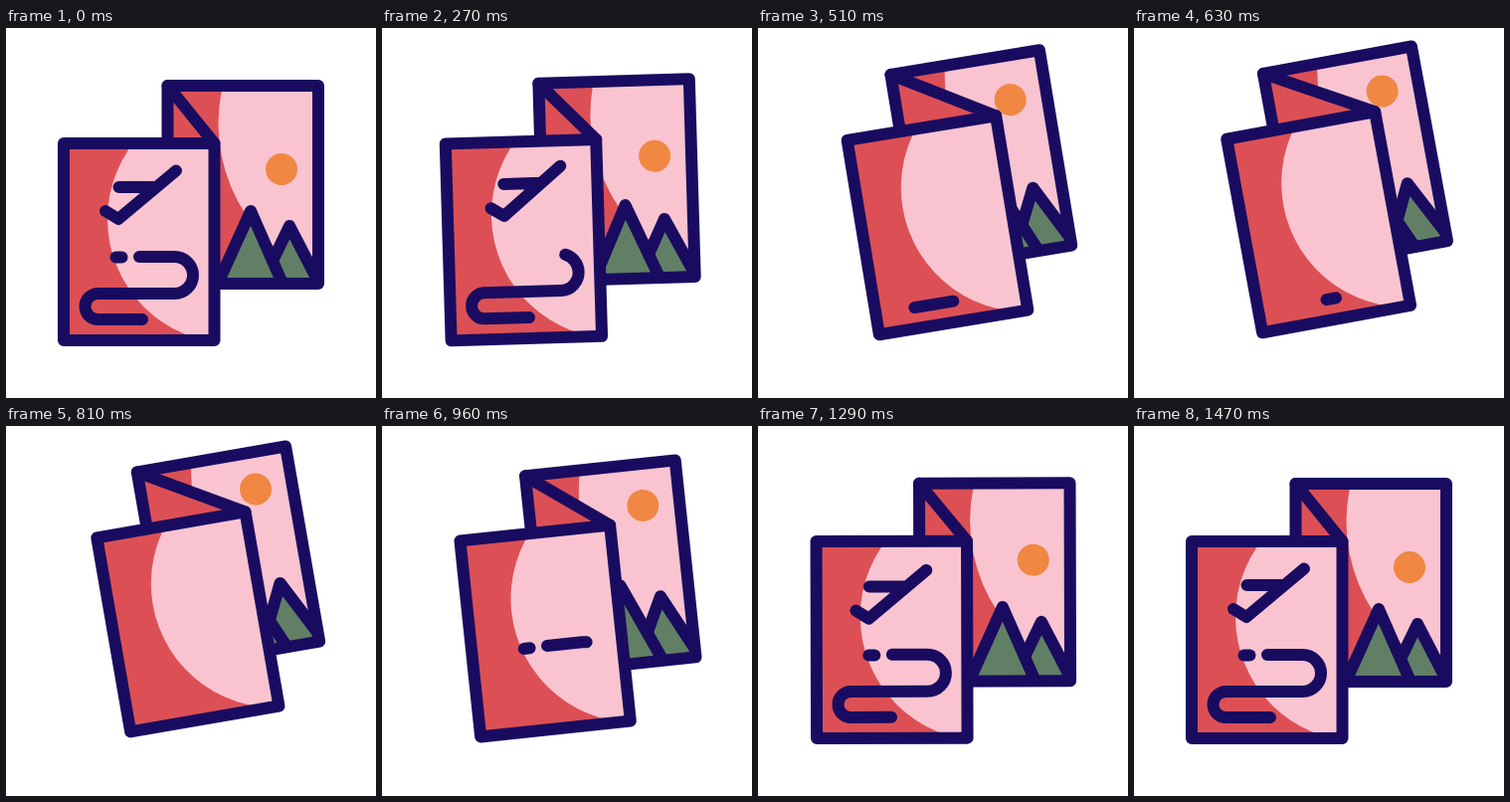
An HTML page for the animation above (1800 ms loop, 372 by 372 pixels).

```html
<!DOCTYPE html>
<html lang="en">
<head>
<meta charset="utf-8">
<title>Travel cards</title>
<style>
  html, body { margin: 0; width: 100%; height: 100%; overflow: hidden; background: #fff; }
  svg { display: block; width: 100vw; height: 100vh; }
  .ink { stroke: #190c60; stroke-width: 12; stroke-linecap: round; stroke-linejoin: round; fill: none; }
  .red { fill: #dc5055; }
  .pink { fill: #f9c4d0; }
  .hill { fill: #617f65; }
</style>
</head>
<body>
<svg viewBox="0 0 372 372">
  <defs>
    <clipPath id="backClip"><rect x="162.5" y="58" width="151.5" height="199"/></clipPath>
    <clipPath id="frontClip"><rect x="58" y="116" width="151.5" height="198"/></clipPath>
  </defs>
  <g id="cards">
    <g clip-path="url(#backClip)">
      <rect class="red" x="162" y="58" width="152" height="199"/>
      <circle class="pink" cx="378.5" cy="96" r="165"/>
      <circle id="sun" cx="277" cy="142" r="16" fill="#f08743"/>
      <g id="hills">
        <path class="ink hill" d="M248.800 274 L285 199 L323.800 274"/>
        <path class="ink hill" d="M205.300 274 L246 184 L285.500 274"/>
      </g>
    </g>
    <path id="flap" class="ink red"/>
    <rect class="ink" x="162.5" y="58" width="151.5" height="199"/>
    <g id="front">
      <g clip-path="url(#frontClip)">
        <rect class="red" x="58" y="116" width="152" height="198"/>
        <circle class="pink" cx="227" cy="192" r="125"/>
        <path id="plane" class="ink" d="M171 143.500 L113 192 L100 184 M113.500 160 H150"/>
      </g>
      <path id="dash" class="ink" d="M110.500 230.500 H116.500" pathLength="6"/>
      <path id="route" class="ink" pathLength="256"
        d="M134 230 H169.500 a18.500 18.500 0 0 1 0 37 H92.500 a13 13 0 0 0 0 26 H137"/>
      <rect class="ink" x="58" y="116" width="151.5" height="198"/>
    </g>
  </g>
</svg>
<script>
const LOOP = 1800;
const el = id => document.getElementById(id);
const cards = el('cards'), front = el('front'), flap = el('flap'), sun = el('sun');
const hills = el('hills'), plane = el('plane'), dash = el('dash'), route = el('route');

// Eased progress from 0 to 1 between two times; a and b are the handle x positions.
function ease(t, from, to, a, b) {
  const u = (t - from) / (to - from);
  if (u <= 0) return 0;
  if (u >= 1) return 1;
  let lo = 0, hi = 1, s = 0.5;
  for (let i = 0; i < 24; i++) {
    s = (lo + hi) / 2;
    const r = 1 - s;
    if (3 * r * r * s * a + 3 * r * s * s * b + s * s * s < u) lo = s; else hi = s;
  }
  return s * s * (3 - 2 * s);
}

const move = (node, x, y) => node.setAttribute('transform', `translate(${x} ${y})`);

// Shows only the part of a path between two lengths.
function trim(node, start, end) {
  const len = end - start;
  node.style.display = len > 0.05 ? '' : 'none';
  node.setAttribute('stroke-dasharray', `${Math.max(len, 0)} 999`);
  node.setAttribute('stroke-dashoffset', -start);
}

function draw(t) {
  const turn = ease(t, 90, 690, 0.54, 0.38) - ease(t, 690, 1380, 0.446, 0.346);
  const leave = ease(t, 90, 780, 0.48, 0.28);
  const enter = ease(t, 810, 1340, 0.45, 0.55);
  const sunRise = leave - ease(t, 810, 1470, 0.45, 0.55);
  const hillRise = leave - ease(t, 960, 1470, 0.45, 0.55);
  const slide = 57 * turn;

  cards.setAttribute('transform', `rotate(${-10.55 * turn} 80 230)`);
  move(front, slide, 0);
  flap.setAttribute('d', `M162.5 58 L${209.5 + slide} 116 L162.5 257`);
  move(sun, 0, -46.8 * sunRise);
  move(hills, 0, -6.5 * hillRise);

  if (t < 810) {
    const out = ease(t, 210, 810, 0.54, 0.38);
    move(plane, 138 * out, -139 * out);
    trim(dash, 6 * ease(t, 90, 250, 0.4, 0.6), 6);
    trim(route, 256 * leave, 256);
  } else {
    move(plane, -148 * (1 - enter), 108 * (1 - enter));
    trim(dash, 0, 6 * ease(t, 810, 930, 0.4, 0.6));
    trim(route, 0, 256 * enter);
  }
}

let begin = null;
function tick(now) {
  if (begin === null) begin = now;
  draw((now - begin) % LOOP);
  requestAnimationFrame(tick);
}
draw(0);
requestAnimationFrame(tick);
</script>
</body>
</html>
```
